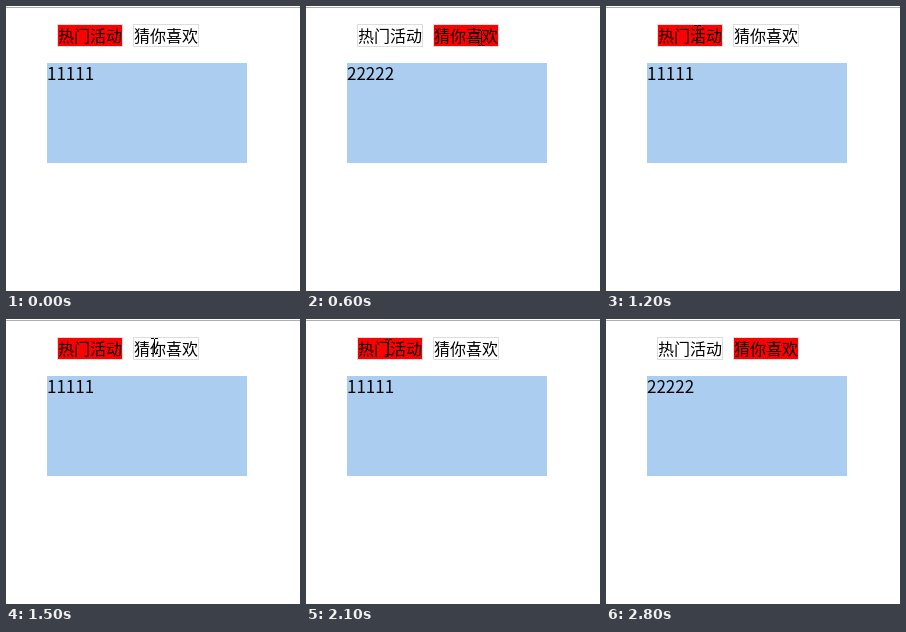
Write an HTML page that moves like this. It is 294 px wide and 285 px high and loops after 3.4 s.

```html
<!DOCTYPE html>
<html lang="zh-CN">
<head>
<meta charset="utf-8">
<title>Tabs</title>
<style>
html, body { margin: 0; width: 100%; height: 100%; overflow: hidden; background: #fff; }
svg { display: block; }
text { font: 16px "Noto Sans CJK SC", "Noto Sans CJK", sans-serif; fill: #000; }
#digits { font-size: 17px; }
.tab rect { fill: #fff; stroke: #ddd; }
.tab.on rect { fill: #f00; }
</style>
</head>
<body>
<svg width="294" height="285" viewBox="0 0 294 285">
  <rect y="1" width="294" height="1" fill="#adadad"/>
  <g class="tab"><rect x="51.5" y="18.5" width="65" height="22"/><text x="52" y="36">热门活动</text></g>
  <g class="tab"><rect x="127.5" y="18.5" width="65" height="22"/><text x="128" y="36">猜你喜欢</text></g>
  <rect x="41" y="57" width="200" height="100" fill="#abcdef"/>
  <text id="digits" x="41" y="74"></text>
  <path id="beam" d="M-3 -7.5H0M1 -7.5H4M.5 -7V7M-3 7.5H0M1 7.5H4" stroke="#000" shape-rendering="crispEdges"/>
  <path id="arrow" d="M.5 .5V16L4 12.7 6.5 18.5 9 17.5 6.5 12H11.3Z" fill="#fff" stroke="#000"/>
</svg>
<script>
const LOOP = 3400, STEP = 100, ENTER = 100;
// The pointer glides to each stop and rests there; the tab switches when the rest ends.
const ENTRY = { x: 218, y: 51 };
const STOPS = [
  { x: 175, y: 32, move: 200, rest: 300 },
  { x: 91, y: 27, move: 300, rest: 300 },
  { x: 148, y: 27, move: 300, rest: 100 },
  { x: 82, y: 28, move: 200, rest: 300 },
  { x: 158, y: 30, move: 300, rest: 200 },
  { x: 160, y: 73, move: 100, rest: 100 }
];
const tabs = document.querySelectorAll('.tab');
const digits = document.getElementById('digits');
const beam = document.getElementById('beam');
const arrow = document.getElementById('arrow');

const easeOut = k => Math.sin(Math.min(k, 1) * Math.PI / 2);
const mix = (a, b, k) => Math.round(a + (b - a) * k);

// Walks the stops; returns the pointer and the number of switches so far.
function stateAt(t) {
  let from = ENTRY, left = t - ENTER;
  for (const [i, to] of STOPS.entries()) {
    if (left < to.move + to.rest) {
      const k = easeOut(Math.max(left, 0) / to.move);
      return { x: mix(from.x, to.x, k), y: mix(from.y, to.y, k), switches: i, visible: left >= 0 };
    }
    left -= to.move + to.rest;
    from = to;
  }
  return { x: from.x, y: from.y, switches: STOPS.length - 1, visible: false };
}

const overTab = (x, y) =>
  y >= 18 && y < 41 && [51, 127].some(left => x >= left && x < left + 66);

function show(el, visible, x, y) {
  el.style.display = visible ? '' : 'none';
  el.setAttribute('transform', `translate(${x} ${y})`);
}

function render(t) {
  const { x, y, switches, visible } = stateAt(t);
  const active = switches % 2;
  tabs.forEach((tab, i) => tab.classList.toggle('on', i === active));
  digits.textContent = String(active + 1).repeat(5);
  const over = overTab(x, y);
  show(beam, visible && over, x, y);
  show(arrow, visible && !over, x, y);
}

const start = performance.now();
function tick() {
  const t = (performance.now() - start) % LOOP;
  render(Math.floor(t / STEP) * STEP);
  requestAnimationFrame(tick);
}
tick();
</script>
</body>
</html>
```
